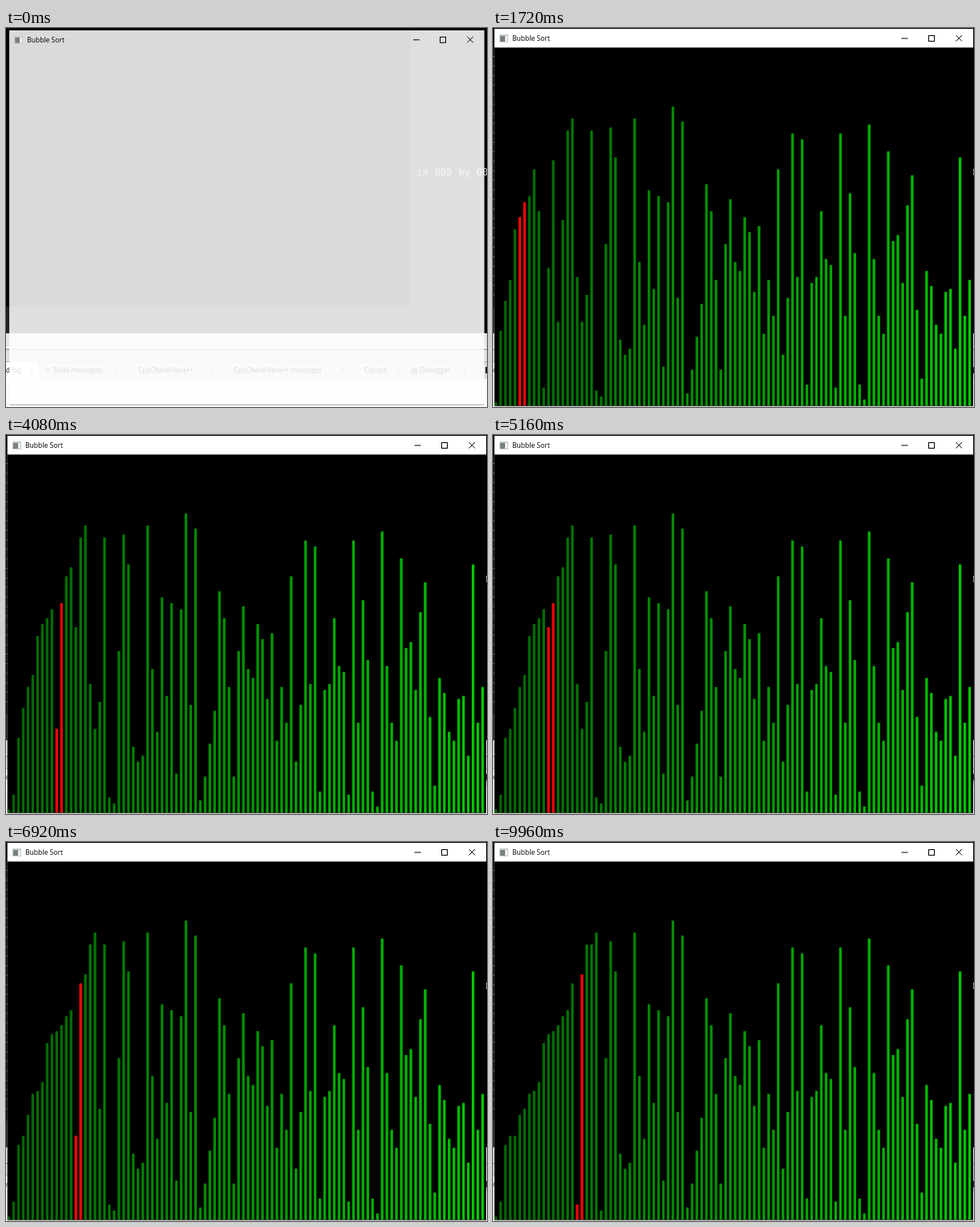
An HTML page with a canvas that plays this animation: 600x473 px, repeating every 10000 ms.

```html
<!DOCTYPE html>
<html lang="en">
<head>
<meta charset="utf-8">
<title>Bubble Sort</title>
<style>
  html, body { margin: 0; width: 100%; height: 100%; overflow: hidden; background: #000; }
  canvas { display: block; width: 600px; height: 473px; }
</style>
</head>
<body>
<canvas id="stage" width="600" height="473"></canvas>
<script>
const ctx = document.getElementById('stage').getContext('2d');
const LOOP = 10000, STEP = 40;
const OPENED = 120;    // ms until the bars appear
const COUNT = 100;
const UNIT = 3.73;     // bar height per value
const PITCH = 5.97;    // distance between bars
const FLOOR = 471.5;
const SANS = '"Open Sans", "Noto Sans", sans-serif';

// Key points: time in ms, number of swaps done
const pace = [
  [100, 0], [1720, 15.3], [1920, 16], [2480, 22.05], [2640, 23],
  [3080, 27.5], [5160, 46.5], [6920, 64.5], [8720, 81.5], [LOOP, 92.5]
];

// Linear congruential generator with 15-bit output, seed 1
function makeValues() {
  let seed = 1;
  return Array.from({ length: COUNT }, () => {
    seed = (Math.imul(seed, 214013) + 2531011) >>> 0;
    return ((seed >>> 16) & 0x7fff) % 100 + 1;
  });
}

// Left position of each swap, in order
function listSwaps(source) {
  const a = source.slice(), list = [];
  for (let i = 1; i < a.length; i++) {
    for (let j = i; j > 0 && a[j - 1] > a[j]; j--) {
      swap(a, j - 1);
      list.push(j - 1);
    }
  }
  return list;
}

function swap(a, j) {
  [a[j], a[j + 1]] = [a[j + 1], a[j]];
}

const values = makeValues();
const swaps = listSwaps(values);

function swapsAt(t) {
  if (t <= pace[0][0]) return 0;
  const k = pace.findIndex(p => p[0] > t);
  const [t0, n0] = pace[k - 1], [t1, n1] = pace[k];
  return Math.floor(n0 + (n1 - n0) * (t - t0) / (t1 - t0));
}

function rect(x, y, w, h, color) {
  ctx.fillStyle = color;
  ctx.fillRect(x, y, w, h);
}

function text(str, x, y, size, color, font = SANS) {
  ctx.font = `${size}px ${font}`;
  ctx.fillStyle = color;
  ctx.fillText(str, x, y);
}

function line(color, ...points) {
  ctx.strokeStyle = color;
  ctx.lineWidth = 1;
  ctx.beginPath();
  points.forEach(([x, y], i) => i ? ctx.lineTo(x, y) : ctx.moveTo(x, y));
  ctx.stroke();
}

function dot(x, y, r, color) {
  ctx.fillStyle = color;
  ctx.beginPath();
  ctx.arc(x, y, r, 0, 2 * Math.PI);
  ctx.fill();
}

function drawTab(x, label, closeX) {
  text(label, x, 430, 8.4, '#000');
  text('×', closeX, 431, 9, '#555');
}

function drawDesktop(t) {
  rect(0, 0, 600, 473, '#040204');
  rect(505, 3, 92, 378, '#1e201c');
  rect(0, 348, 597, 33, '#20221f');
  rect(0, 381, 600, 92, '#fafafa');
  rect(0, 381, 600, 17, '#e6e4e6');
  rect(0, 400, 600, 2, '#a9a6a9');
  rect(0, 402, 600, 14, '#e2dfe2');
  rect(0, 416, 600, 1, '#aaa');
  rect(0, 417, 600, 21, '#dadada');
  rect(0, 417, 40, 21, '#fff');
  if (t >= OPENED) {
    for (let y = 35; y < 340; y += 11.9) rect(0, y, 1.5, 1, '#777');
  }
  text('in 805 by 600', 512, 184, 12.4, '#ccc', '"DejaVu Sans Mono", monospace');
  drawTab(0, 'd log', 30);
  drawTab(59, 'Build messages', 136);
  drawTab(165, 'CppCheck/Vera++', 255);
  drawTab(284, 'CppCheck/Vera++ messages', 417);
  drawTab(447, 'Cscope', 486);
  drawTab(516, 'Debugger', 569);
  dot(52, 427, 3, '#999');
  dot(509, 428, 4.5, '#888');
  rect(598, 423, 2, 8, '#222');
}

function drawTitleBar() {
  rect(8, 8, 11, 10, '#c9cdca');
  rect(9, 10, 6, 7, '#78817c');
  rect(15, 10, 3, 7, '#edf0ee');
  text('Bubble Sort', 24, 16.2, 8.6, '#000');
  line('#000', [509.5, 13], [517.5, 13]);
  ctx.strokeRect(543.5, 9.5, 7, 7);
  line('#000', [577.5, 9], [585, 16.5]);
  line('#000', [585, 9], [577.5, 16.5]);
}

function drawBars(t) {
  const a = values.slice(), n = swapsAt(t);
  swaps.slice(0, n).forEach(j => swap(a, j));
  const hot = n ? swaps[n - 1] : -2;
  a.forEach((v, i) => {
    const red = i === hot || i === hot + 1;
    const h = v * UNIT + 0.4;
    rect(1.9 + PITCH * i, FLOOR - h, 3.3, h, red ? '#f80404' : `rgb(0,${100 + i},0)`);
  });
}

function draw(t) {
  drawDesktop(t);
  // The window fades and grows in
  const p = Math.min(1, t / OPENED);
  const scale = 0.992 + 0.008 * p;
  ctx.save();
  ctx.translate(300.5, 237);
  ctx.scale(scale, scale);
  ctx.translate(-300.5, -237);
  ctx.globalAlpha = 0.855 + 0.145 * p;
  rect(1.7, 1, 597.3, 471, '#fff');
  ctx.globalAlpha = 1;
  drawTitleBar();
  if (t >= OPENED) {
    rect(1.7, 24.4, 597.3, 447.6, '#000');
    drawBars(t);
  }
  rect(2, 471.6, 597, 0.8, '#8a8a8a');
  ctx.restore();
}

const start = performance.now();
function tick() {
  const t = (performance.now() - start) % LOOP;
  draw(Math.floor(t / STEP) * STEP);
  requestAnimationFrame(tick);
}
tick();
</script>
</body>
</html>
```
